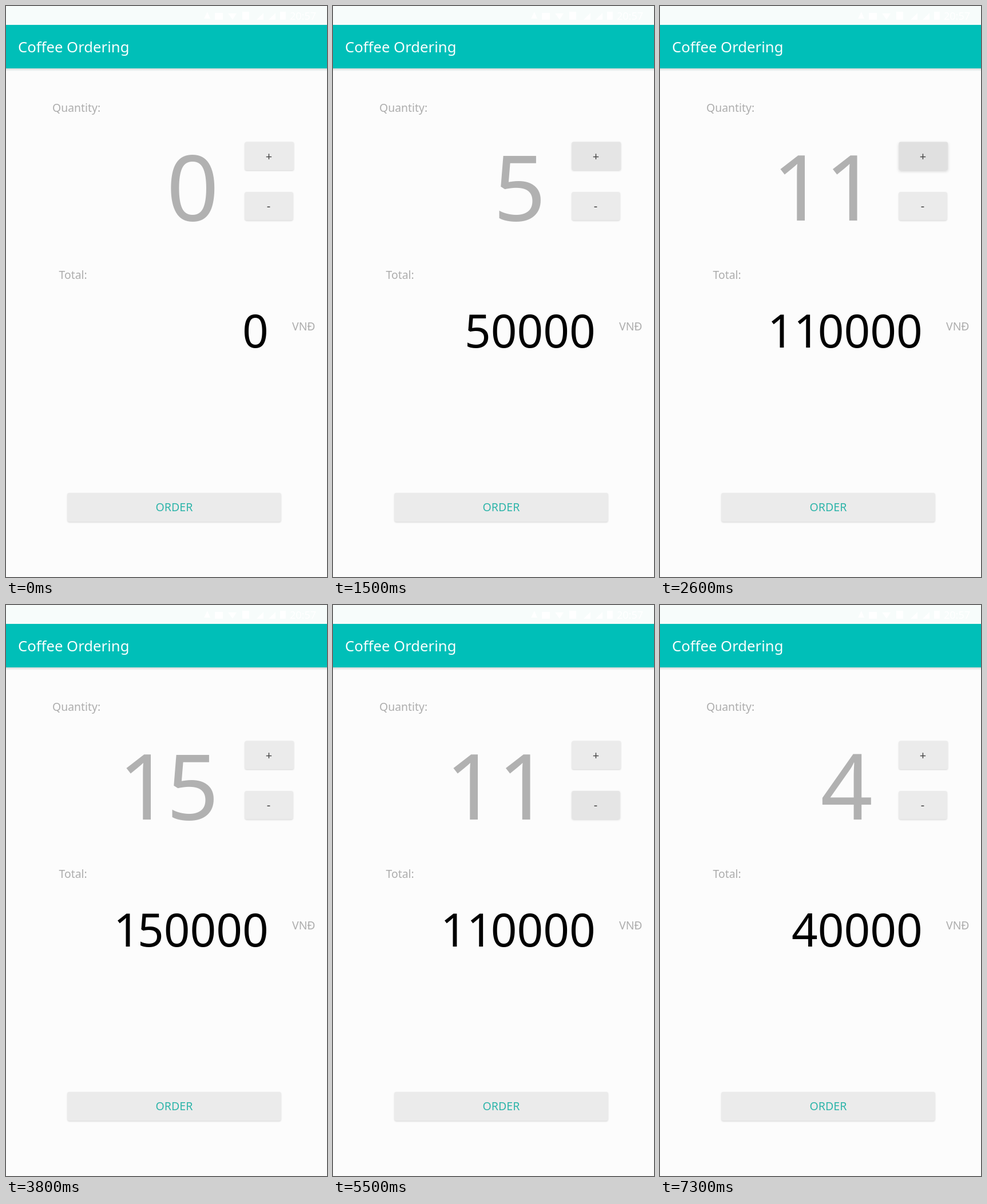
Write an HTML page that moves like this. It is 561 px wide and 998 px high and loops after 8 s.

```html
<!DOCTYPE html>
<html lang="en">
<head>
<meta charset="utf-8">
<title>Coffee Ordering</title>
<style>
  html, body { margin: 0; width: 100%; height: 100%; overflow: hidden; background: #fcfcfc; }
  svg { display: block; width: 100%; height: 100%; font-family: "Noto Sans", "Open Sans", sans-serif; }
  .label { font-size: 19.4px; fill: #adadad; }
  .sign { font-size: 20px; fill: #444; text-anchor: middle; }
  .digits { text-anchor: middle; }
  .button { fill: #ebebeb; filter: drop-shadow(0 1px 1px rgba(0, 0, 0, .16)); }
</style>
</head>
<body>
<svg viewBox="0 0 561 998">
  <defs>
    <linearGradient id="shade" x2="0" y2="1">
      <stop stop-color="#d4d8d8"/>
      <stop offset="1" stop-color="#fcfcfc"/>
    </linearGradient>
  </defs>
  <rect width="561" height="998" fill="#fcfcfc"/>

  <!-- status bar -->
  <rect width="561" height="33" fill="#f7fcfb"/>
  <g fill="#fff">
    <path d="M346 22l6-12 5 12zM365 12h14v12h-14zM388 13h15l-7 11zM413 10h12v14h-12zM438 24l12-12v12zM459 24l12-12v12zM479 10h10v14h-10z"/>
    <text x="496" y="24" font-size="18">20:57</text>
  </g>

  <!-- app bar -->
  <rect y="109" width="561" height="5" fill="url(#shade)"/>
  <rect y="33" width="561" height="76" fill="#00bfb8"/>
  <text x="21" y="81" font-size="25.7" font-weight="500" fill="#fafefe">Coffee Ordering</text>

  <text class="label" x="81" y="185">Quantity:</text>
  <text class="label" x="92.5" y="476.5">Total:</text>
  <text class="label" x="500" y="567">VNĐ</text>

  <rect class="button" id="plus" x="417.5" y="237.5" width="85.5" height="49.5" rx="3"/>
  <text class="sign" x="459.5" y="270">+</text>
  <rect class="button" id="minus" x="417.5" y="325" width="84" height="49.5" rx="3"/>
  <text class="sign" x="459" y="357">-</text>
  <rect class="button" x="107.5" y="851" width="373" height="50.5" rx="3"/>
  <text x="294" y="882.5" font-size="19.6" fill="#2fb5aa" text-anchor="middle">ORDER</text>

  <text class="digits" id="quantity" y="375" font-size="160" fill="#b1b1b1"></text>
  <text class="digits" id="total" y="597" font-size="80" fill="#000"></text>
</svg>
<script>
const LOOP = 8000, STEP = 100, PRICE = 10000;
const plusTaps = [500, 1000, 1100, 1300, 1500, 1700, 1800, 2000, 2200, 2400, 2500, 2700, 2900, 3100, 3200];
const minusTaps = [4900, 5100, 5300, 5500, 5700, 5900, 6000, 6200, 6400, 6600, 6900];
const byId = id => document.getElementById(id);
const countUntil = (taps, time) => taps.filter(tap => tap <= time).length;

// Fixed-width cells, laid out leftwards from the centre of the last digit.
function showNumber(id, value, lastCenter, size) {
  const text = String(value), pitch = size * 0.572;
  const centers = [...text].map((digit, i) =>
    lastCenter - (text.length - 1 - i) * pitch + (digit === '1' ? size * 0.045 : 0));
  const node = byId(id);
  if (node.textContent === text) return;
  node.setAttribute('x', centers.join(' '));
  node.textContent = text;
}

// A press darkens the button quickly and fades out if no new tap follows.
function showPress(id, taps, time) {
  const age = time - Math.max(-LOOP, ...taps.filter(tap => tap <= time));
  const level = age <= 100 ? 0.55 + 0.45 * age / 100 : Math.max(0, 1 - (age - 100) / 200);
  const gray = Math.round(235 - 11 * level);
  const node = byId(id);
  node.style.fill = `rgb(${gray}, ${gray}, ${gray})`;
  node.style.filter =
    `drop-shadow(0 ${1 + level}px ${1 + 1.5 * level}px rgba(0, 0, 0, .16))`;
}

function draw() {
  const time = Math.floor(performance.now() % LOOP / STEP) * STEP;
  const count = countUntil(plusTaps, time) - countUntil(minusTaps, time);
  showNumber('quantity', count, 326.3, 160);
  showNumber('total', count * PRICE, 436, 80);
  // The first and the last tap leave no visible press.
  showPress('plus', plusTaps.slice(1), time);
  showPress('minus', minusTaps.slice(0, -1), time);
  requestAnimationFrame(draw);
}
draw();
</script>
</body>
</html>
```
